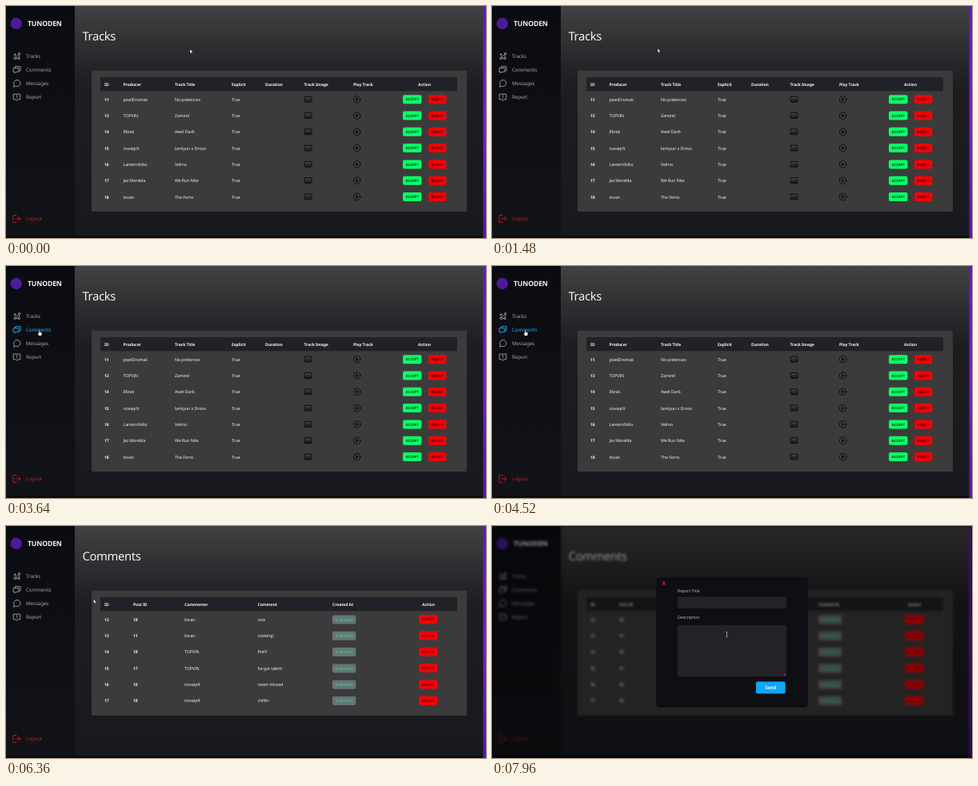
These frames come from a looping animation (600 px wide and 290 px high, 8000 ms). An HTML page:

```html
<!DOCTYPE html>
<html lang="en">
<head>
<meta charset="utf-8">
<title>Admin dashboard</title>
<style>
html, body { margin: 0; width: 100%; height: 100%; overflow: hidden; background: #08090c; }
svg { display: block; width: 600px; height: 290px; }
text { font: 5.3px "Noto Sans", "Open Sans", sans-serif; letter-spacing: -.02em; fill: #f1f1f1; text-rendering: geometricPrecision; }
.b { font-weight: 700; font-size: 5.1px; }
.h1 { font-size: 14.8px; font-weight: 500; letter-spacing: -.025em; }
.brand { font-size: 8.7px; font-weight: 600; }
.nav { color: #a3a4a8; }
.nav.on { color: #35a5f5; }
.nav text { font-size: 6.3px; fill: currentColor; }
.icon { fill: none; stroke: currentColor; stroke-width: .9; stroke-linejoin: round; stroke-linecap: round; }
.tag { font-size: 4.5px; font-weight: 700; letter-spacing: 0; }
.mid { text-anchor: middle; }
.blur { filter: blur(1.5px); }
.label { fill: #b4b4b8; }
</style>
</head>
<body>
<svg viewBox="0 0 600 290">
  <defs>
    <linearGradient id="page" x2="0" y2="1">
      <stop stop-color="#424244"/><stop offset=".16" stop-color="#303033"/>
      <stop offset=".34" stop-color="#1d1d22"/><stop offset="1" stop-color="#18191e"/>
    </linearGradient>
    <linearGradient id="side" x2="0" y2="1">
      <stop stop-color="#0b0c11"/><stop offset="1" stop-color="#121318"/>
    </linearGradient>
    <linearGradient id="edge" x2="0" y2="1">
      <stop stop-color="#6517c4"/><stop offset=".5" stop-color="#7a1be0"/><stop offset="1" stop-color="#5a14bd"/>
    </linearGradient>
  </defs>
  <g id="app">
    <rect width="600" height="290" fill="url(#page)"/>
    <rect width="86" height="290" fill="url(#side)"/>
    <rect y="287" width="596" height="3" fill="#0b0c10"/>
    <rect x="596.5" width="3.5" height="290" fill="url(#edge)"/>
    <circle cx="12.8" cy="22" r="7.2" fill="#4a1c9c"/>
    <text class="brand" x="27" y="25">TUNODEN</text>
    <g id="menu"></g>
    <g color="#c91a1e">
      <path class="icon" d="M13 261.5H9V270.500H13M12 266H18M15.500 263.500L18 266L15.500 268.500" stroke-width="1.100"/>
      <text x="25" y="268.200" style="font-size:6.300px;font-weight:500;fill:#c91a1e">Logout</text>
    </g>
    <g id="tracks"></g>
    <g id="comments"></g>
  </g>
  <g id="modal">
    <rect width="600" height="290" fill="#000" opacity=".4"/>
    <rect x="205" y="64" width="190" height="163" rx="5" fill="#0e0f14"/>
    <text class="mid" x="214.700" y="74.300" style="font-size:6.400px;font-weight:700;fill:#e0302c">X</text>
    <text class="label" x="232" y="82.500">Report Title</text>
    <rect x="232" y="88.500" width="136" height="14.500" rx="1.500" fill="#222328"/>
    <text class="label" x="232" y="115.500">Description</text>
    <rect x="232" y="124" width="136" height="64" rx="1.500" fill="#222328"/>
    <path d="M364.500 187L367 184.500M366 187L367 186" stroke="#aaa" stroke-width=".5"/>
    <rect x="330" y="194.500" width="36.700" height="15" rx="2" fill="#10a6fb"/>
    <text class="b mid" x="348.300" y="204.200" style="font-size:6px">Send</text>
  </g>
  <g id="cursor">
    <path id="arrow" d="M0 0V5.200L1.200 4.100L2.100 6L2.900 5.600L2 3.800H3.600Z" fill="#fff" stroke="#000" stroke-width=".35"/>
    <path id="hand" d="M-.6 .4Q0 -.4 .6 .4V3L3 3.600Q3.600 4 3.300 5.500L2.700 7.800H-.3L-2 5Q-2 4 -.6 4.700Z" fill="#fff" stroke="#000" stroke-width=".35"/>
    <path id="beam" d="M-1 -2.800H1M0 -2.800V2.800M-1 2.800H1" fill="none" stroke="#d5d5d5" stroke-width=".6"/>
  </g>
</svg>
<script>
const $ = id => document.getElementById(id);
const LOOP = 8000, COMMENTS_AT = 4720, MODAL_AT = 7480;

const text = (x, y, s, cls = '') => `<text x="${x}" y="${y}" class="${cls}">${s}</text>`;
const box = (x, y, w, h, fill, r = 0) =>
  `<rect x="${x}" y="${y}" width="${w}" height="${h}" rx="${r}" fill="${fill}"/>`;
const pill = (x, y, w, fill, ink, s) => box(x, y - 5.5, w, 11, fill, 2) +
  `<text class="tag mid" x="${x + w / 2}" y="${y + 1.7}" style="fill:${ink}">${s}</text>`;
const rowY = i => 116.7 + i * 20.3;

const picture = y => `<g transform="translate(373 ${y - 3.8})" class="icon" color="#0a0a0a">
  <rect x=".3" y=".3" width="8.800" height="7" rx=".8"/><path d="M1.500 5.800L3.500 3.600L4.800 4.800L6.200 3L8 5.800Z"/></g>`;
const play = y => `<g transform="translate(438.700 ${y})" color="#0a0a0a">
  <circle class="icon" r="4.300"/><path d="M-1.300 -2.200L2.200 0L-1.300 2.200Z" fill="#0a0a0a"/></g>`;

function table(title, bottom, heads, actionX, rows, drawRow) {
  return text(95.5, 43.2, title, 'h1') +
    box(107, 80.5, 469, bottom - 80.5, '#3b3b3c', 1.5) + box(118, 89, 446, 17.3, '#212227') +
    heads.map(([x, s]) => text(x, 99.6, s, 'b')).join('') +
    text(actionX, 99.6, 'Action', 'b mid') +
    rows.map((row, i) => drawRow(row, rowY(i))).join('');
}

$('tracks').innerHTML = table('Tracks', 257,
  [[123, 'ID'], [146.5, 'Producer'], [211, 'Track Title'], [282, 'Explicit'], [324, 'Duration'],
   [372.5, 'Track Image'], [434, 'Play Track']], 523,
  [[11, 'pixelDromak', 'No pretences'], [13, 'TOPVIN', 'Zamirel'], [14, 'Ilbrak', 'Awel Darb'],
   [15, 'novaqrlt', 'lamiyun x Drovo'], [16, 'Lanternfolks', 'Velmo'],
   [17, 'Jaz Morelda', 'We Run Nite'], [18, 'tovan', 'The Ferns']],
  ([id, producer, name], y) => text(123, y + 2, id, 'b') + text(146.5, y + 2, producer) +
    text(211, y + 2, name) + text(282, y + 2, 'True') + picture(y) + play(y) +
    pill(496, y, 23.5, '#0bff68', '#063b1c', 'ACCEPT') + pill(528, y, 22.3, '#fb0004', '#4a0002', 'REJECT'));

$('comments').innerHTML = table('Comments', 237,
  [[123, 'ID'], [159, 'Post ID'], [223, 'Commenter'], [314.5, 'Comment'], [408, 'Created At']], 528,
  [[12, 18, 'tovan', 'nice'], [13, 11, 'tovan', 'cooking!'], [14, 18, 'TOPVIN', 'fire!!!'],
   [15, 17, 'TOPVIN', 'he got talent'], [16, 10, 'novaqrlt', 'never missed'], [17, 18, 'novaqrlt', 'chillin']],
  ([id, post, who, words], y) => text(123, y + 2, id, 'b') + text(159, y + 2, post, 'b') +
    text(223, y + 2, who) + text(314.5, y + 2, words) +
    pill(408, y + .3, 29.3, '#6b7279', '#20d873', '5/20/2024') +
    pill(516.3, y, 23, '#fb0004', '#4a0002', 'DELETE'));

const menu = [
  ['Tracks', 62.5, 'M3 6.500L7 2.500M4 7.500H6M7.500 4V6M1 7.500a1.400 1.400 0 1 0 2.800 0a1.400 1.400 0 1 0 -2.800 0M6 7.800a1.200 1.200 0 1 0 2.400 0a1.200 1.200 0 1 0 -2.400 0M6.500 1.800a1.200 1.200 0 1 0 2.400 0a1.200 1.200 0 1 0 -2.400 0M1 3H3.500M2.300 1.800V4.200'],
  ['Comments', 79.6, 'M2.500 2.500V.7H9V6H7.500M.5 2.700H7V7.500H3.500L1.800 9V7.500H.5Z'],
  ['Messages', 96.8, 'M.7 8.800L1.200 6.500A4.100 4.100 0 1 1 3 8.200Z'],
  ['Report', 114, 'M.6 .8H8.800V7.500H6L4.700 9L3.400 7.500H.6ZM4.700 2.300V4.500M4.700 5.800V5.900']
];
$('menu').innerHTML = menu.map(([name, y, d]) => `<g class="nav">
  <path class="icon" transform="translate(9 ${y - 4.7})" d="${d}"/>${text(25, y + 2.2, name)}</g>`).join('');
const items = [...$('menu').children];

// Pointer stops: time, x, y
const stops = [[0, 230, 54], [500, 230, 54], [1400, 207, 53], [1640, 207, 53], [2720, 37.5, 74],
  [2820, 37.5, 74], [3100, 41.5, 79.5], [5120, 41.5, 79.5], [6240, 109.5, 91.5], [6480, 109.5, 91.5],
  [7260, 39, 110.5], [7540, 39, 110.5], [7920, 293.5, 135.5], [LOOP, 293.5, 135.5]];

function pointer(t) {
  const i = stops.findIndex(s => s[0] > t);
  const [t0, x0, y0] = stops[i - 1], [t1, x1, y1] = stops[i];
  const p = (t - t0) / (t1 - t0), e = p * p * (3 - 2 * p);
  return [x0 + (x1 - x0) * e, y0 + (y1 - y0) * e];
}

const show = (id, on) => $(id).style.display = on ? '' : 'none';

function draw(t) {
  const [x, y] = pointer(t), modal = t >= MODAL_AT, comments = t >= COMMENTS_AT;
  const hover = modal ? -1 : menu.findIndex(m => x > 8 && x < 57 && Math.abs(y - m[1]) < 5);
  const typing = modal && x > 232 && x < 368 && y > 124;
  const linked = hover >= 0 && hover < 3;
  items.forEach((el, i) => el.classList.toggle('on', i === hover));
  show('tracks', !comments);
  show('comments', comments);
  show('modal', modal);
  $('app').classList.toggle('blur', modal);
  show('beam', typing);
  show('hand', linked);
  show('arrow', !typing && !linked);
  $('cursor').setAttribute('transform', `translate(${x} ${y})`);
}

const start = performance.now();
function tick() {
  draw((performance.now() - start) % LOOP);
  requestAnimationFrame(tick);
}
tick();
</script>
</body>
</html>
```
